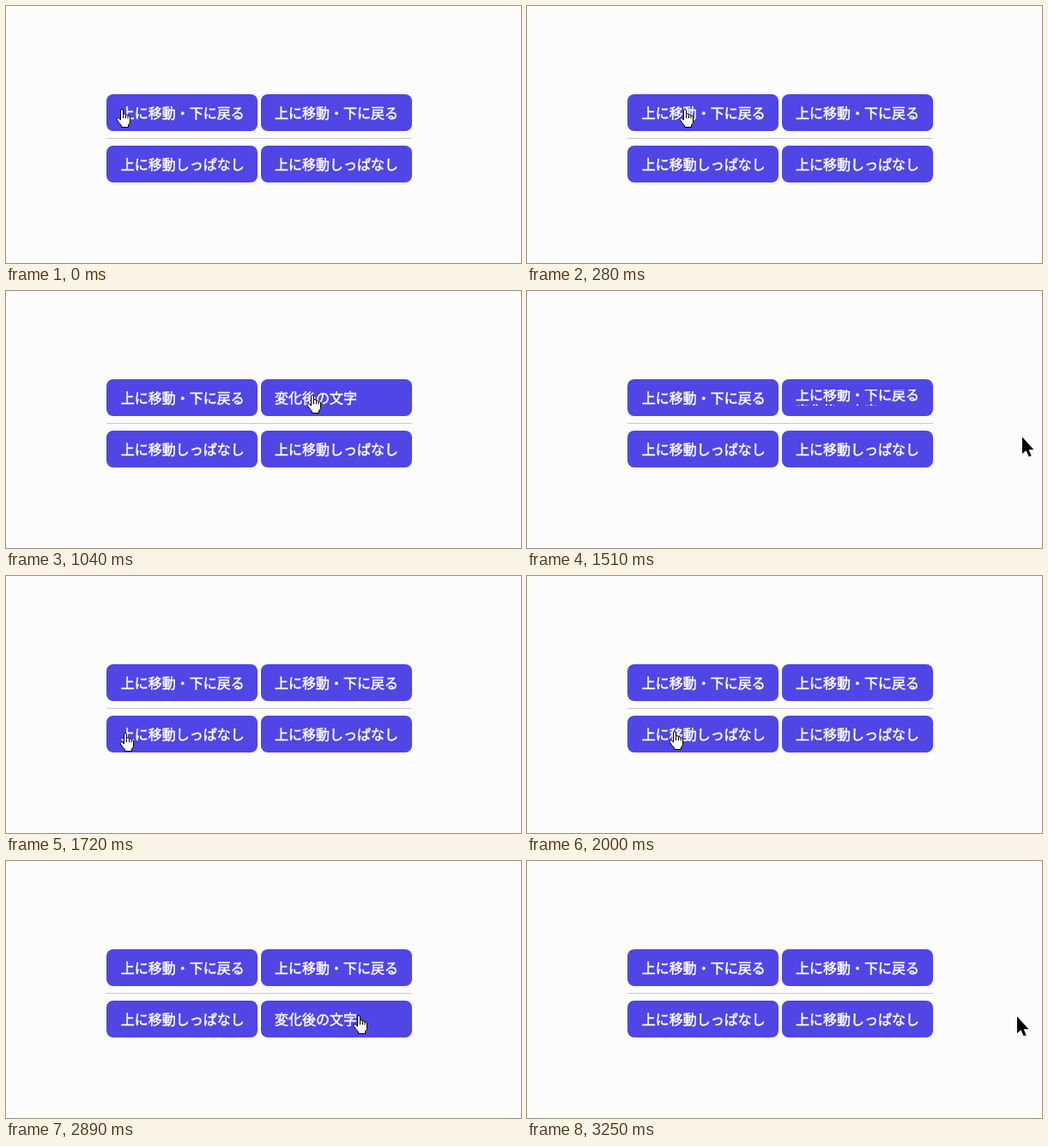
An HTML page that plays this animation: 600 by 300 pixels, repeating every 3320 ms.

```html
<!DOCTYPE html>
<html lang="ja">
<head>
<meta charset="utf-8">
<title>Button text slide</title>
<style>
  html, body { margin: 0; width: 100%; height: 100%; overflow: hidden; background: #fcfcfc; }
  svg { display: block; width: 600px; height: 300px; }
  text {
    font: 500 16px "Noto Sans CJK JP", "Noto Sans CJK", sans-serif;
    fill: #fff; stroke: #fff; stroke-width: .5px;
  }
</style>
</head>
<body>
<svg viewBox="0 0 600 300">
  <rect width="600" height="300" fill="#fcfcfc"/>
  <rect x="117" y="154" width="356" height="1" fill="#c8c8c8"/>
  <g id="buttons"></g>
  <path id="arrow" d="M0 -.5V19L4.5 15.3 7.8 22.5 10.6 21.3 7.6 14.2H13.4Z"
        fill="#000" stroke="#fff" paint-order="stroke"/>
  <g id="hand" stroke="#000" stroke-linejoin="round">
    <path fill="#fff" d="M-1.5 13V2Q-1.5 .5 0 .5T1.5 2V6.5Q1.5 5.5 3 5.7T4.5 7.5Q4.6 6.5 5.8 6.8T7 8.5Q7.3 7.7 8.3 8T9.5 10V15.5Q9.5 17 7.5 19V21.5H-.5V19.5Q-3 17 -5.8 12.7Q-6.3 11 -5 10.6Q-3.6 10.4 -1.5 13Z"/>
    <path fill="none" d="M1.5 6.5V11M4.5 7.5V11M7 8.5V11.5"/>
  </g>
</svg>
<script>
// The picture refreshes 48 times per loop; all times below are in these ticks.
const LOOP = 3320, TICK = LOOP / 48, LEAD = 15;
const SLIDE = 300 / TICK, LINE = 19;
const LEFT = 117, TOP = 103, WIDTH = 176, HEIGHT = 43, COLUMN = 180, ROW = 60;
const PAD_X = 16, PAD_Y = 12, BASELINE = 28;

const RETURNS = "上に移動・下に戻る", STAYS = "上に移動しっぱなし", AFTER = "変化後の文字";

const buttons = [
  { before: RETURNS, after: RETURNS, enter: 0, leave: 9, slidesBack: true },
  { before: RETURNS, after: AFTER, enter: 9, leave: 19.9, slidesBack: true },
  { before: STAYS, after: STAYS, enter: 24.9, leave: 32.7 },
  { before: STAYS, after: AFTER, enter: 32.7, leave: 43.5 },
];

// Pointer stops, with a smooth glide from each to the next
const stops = [
  { at: 0, x: 135, y: 120 },
  { at: 13.1, x: 357, y: 121 },
  { at: 18, x: 357, y: 121 },
  { at: 22, x: 577, y: 171 },
  { at: 23, x: 555, y: 230 },
  { at: 24, x: 113, y: 200 },
  { at: 25, x: 139, y: 183 },
  { at: 29, x: 172, y: 181 },
  { at: 31, x: 172, y: 181 },
  { at: 34, x: 367, y: 180 },
  { at: 38, x: 371, y: 180 },
  { at: 40, x: 371, y: 180 },
  { at: 47, x: 571, y: 182 },
];

const byId = id => document.getElementById(id);

function add(parent, name, attrs, content = "") {
  const node = document.createElementNS("http://www.w3.org/2000/svg", name);
  for (const key in attrs) node.setAttribute(key, attrs[key]);
  node.textContent = content;
  return parent.appendChild(node);
}

buttons.forEach((b, i) => {
  const column = i % 2;
  b.x = LEFT + COLUMN * column;
  b.y = TOP + ROW * Math.floor(i / 2);
  const root = add(byId("buttons"), "g", { transform: `translate(${b.x} ${b.y})` });
  add(root, "rect", { width: WIDTH, height: HEIGHT, rx: 8, fill: "#4f46e5" });
  const clip = add(root, "clipPath", { id: `clip${i}` });
  add(clip, "rect", { x: PAD_X, y: PAD_Y, width: WIDTH - 2 * PAD_X + 1, height: LINE });
  const view = add(root, "g", { "clip-path": `url(#clip${i})` });
  b.lines = add(view, "g", {});
  const x = column ? PAD_X : PAD_X + .7;
  add(b.lines, "text", { x, y: BASELINE }, b.before);
  add(b.lines, "text", { x, y: BASELINE + LINE }, b.after);
});

const smooth = p => p * p * (3 - 2 * p);

// CSS "ease", cubic-bezier(.25, .1, .25, 1)
function ease(p) {
  if (p <= 0) return 0;
  if (p >= 1) return 1;
  const curve = (a, b, s) => 3 * a * s * (1 - s) ** 2 + 3 * b * s * s * (1 - s) + s ** 3;
  let low = 0, high = 1;
  for (let i = 0; i < 20; i++) {
    const mid = (low + high) / 2;
    if (curve(.25, .25, mid) < p) low = mid; else high = mid;
  }
  return curve(.1, 1, low);
}

function slideAmount(b, tick) {
  if (tick < b.leave) return ease((tick - b.enter) / SLIDE);
  return b.slidesBack ? 1 - ease((tick - b.leave) / SLIDE) : 0;
}

function pointerAt(tick) {
  const next = stops.findIndex(stop => stop.at > tick);
  if (next < 0) return stops.at(-1);
  const from = stops[next - 1], to = stops[next];
  const p = smooth((tick - from.at) / (to.at - from.at));
  return {
    x: Math.round(from.x + (to.x - from.x) * p),
    y: Math.round(from.y + (to.y - from.y) * p),
  };
}

function draw(time) {
  const tick = Math.floor(((time + LEAD) % LOOP) / TICK);
  for (const b of buttons) {
    b.lines.setAttribute("transform", `translate(0 ${-LINE * slideAmount(b, tick)})`);
  }
  const { x, y } = pointerAt(tick);
  const hovering = buttons.some(b =>
    x >= b.x && x < b.x + WIDTH && y >= b.y && y < b.y + HEIGHT);
  for (const [id, shown] of [["hand", hovering], ["arrow", !hovering]]) {
    byId(id).setAttribute("transform", `translate(${x} ${y})`);
    byId(id).setAttribute("visibility", shown ? "visible" : "hidden");
  }
}

const start = performance.now();
function loop() {
  draw(performance.now() - start);
  requestAnimationFrame(loop);
}
loop();
</script>
</body>
</html>
```
